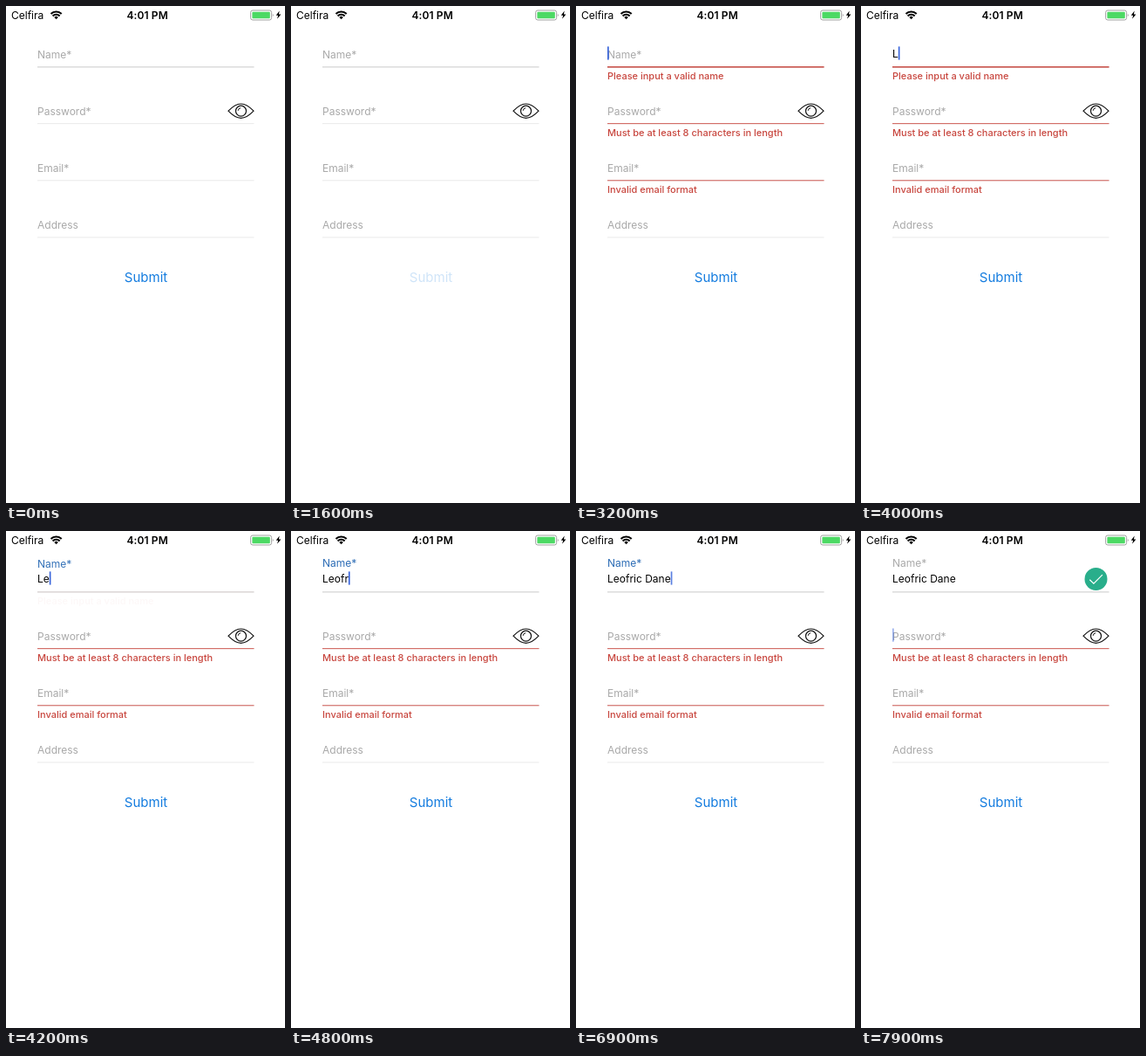
An HTML page that plays this animation: 320 by 569 pixels, repeating every 8000 ms.

```html
<!DOCTYPE html>
<html lang="en">
<head>
<meta charset="utf-8">
<title>Form validation</title>
<style>
  html, body { margin: 0; width: 100%; height: 100%; overflow: hidden; background: #fff; }
  svg { display: block; width: 320px; height: 569px; }
  text { font: 12px Inter, sans-serif; white-space: pre; }
  .label { fill: #a9a9a9; }
  .error { font-size: 11px; font-weight: 500; fill: #c8463e; }
  .time { font-weight: 600; letter-spacing: .1px; }
  #submit { font-size: 15px; fill: #147cdf; text-anchor: middle; }
</style>
</head>
<body>
<svg viewBox="0 0 320 569">
  <text x="6" y="14.5">Celfira</text>
  <g fill="none" stroke="#000" stroke-width="2.1">
    <path d="M51.5 9.1a8.6 8.6 0 0 1 12.2 0M53.6 11.5a5.5 5.5 0 0 1 8 0"/>
    <path d="M57.6 15.2l-2.2-2.3a3.1 3.1 0 0 1 4.4 0z" fill="#000" stroke="none"/>
  </g>
  <text class="time" x="162.2" y="14.5" text-anchor="middle">4:01 PM</text>
  <rect x="280.6" y="5" width="24" height="11" rx="2.4" fill="none" stroke="#8c8c8c" stroke-width=".8"/>
  <rect x="282.4" y="6.8" width="20.4" height="7.4" rx="1" fill="#4cd964"/>
  <path d="M305.9 8.7q1.5 1.8 0 3.6z" fill="#777"/>
  <path d="M313.7 5.6l-4 5.2h2.4l-1 4 4.3-5.4h-2.5z"/>

  <g id="fields"></g>

  <g fill="none" stroke="#111" stroke-width="1.2">
    <path d="M255 120.2C260 115 265 112 269.5 112S279 115 284 120.2C279 125.5 274 128.4 269.5 128.4S260 125.5 255 120.2z"/>
    <circle cx="269.5" cy="120.2" r="6"/>
    <path d="M266.2 119.8a3.4 3.4 0 0 1 3-3.1" stroke-width="1"/>
  </g>
  <text id="title" class="label" x="36">Name*</text>
  <text id="value" x="36" y="59"></text>
  <rect id="caret" width="1.7" height="15.2" fill="#3a66dc"/>
  <g id="check">
    <circle cx="269.5" cy="55" r="13" fill="#29ae8b"/>
    <path d="M262.3 55.7l4.6 4.4 10-10" fill="none" stroke="#fff" stroke-width="1.2"/>
  </g>
  <text id="submit" x="160.5" y="316.3">Submit</text>
</svg>
<script>
const LOOP = 8000, STEP = 100, LEFT = 36, ROW = 65.11;
const NAME = "Leofric Dane";
// When each character of the name has been typed; the space comes with the letter before it.
const KEYS = [4000, 4200, 4400, 4700, 4800, 5100, 5300, 5300, 5800, 5900, 6100, 6300];
const FIELDS = [
  ["Name*", "Please input a valid name", 1.3, "#d6d6d6"],
  ["Password*", "Must be at least 8 characters in length", .8, "#e4e4e4"],
  ["Email*", "Invalid email format", .8, "#e4e4e4"],
  ["Address", "", .8, "#e4e4e4"]
];
const $ = id => document.getElementById(id);

$("fields").innerHTML = FIELDS.map(([label, error, height, gray], i) => {
  const y = i * ROW;
  const line = fill =>
    `<rect x="${LEFT}" y="${y + 69.2}" width="248.5" height="${height}" fill="${fill}"/>`;
  const warning = `<g class="invalid">${line("#c8372f")}
    <text class="error" x="${LEFT}" y="${y + 83.9}">${error}</text></g>`;
  return `<text class="label" x="${LEFT}" y="${y + 59.9}">${label}</text>
    ${line(gray)}${error && warning}`;
}).join("");

const placeholder = document.querySelector(".label");
const invalid = [...document.querySelectorAll(".invalid")];
const clamp = v => Math.min(1, Math.max(0, v));
const easeOut = (t, start, duration) => 1 - (1 - clamp((t - start) / duration)) ** 3;
const show = (el, opacity) => el.setAttribute("opacity", opacity);

function caretOpacity(t) {
  const fade = start => clamp(1 - (t - start) / 300);
  if (t < 3200) return 0;
  if (t < 4000) return fade(3500);
  if (t < 7300) return fade(6850);
  return fade(7750);
}

function draw(t) {
  const alert = easeOut(t, 1600, 500);
  const float = easeOut(t, 4000, 300);
  const done = easeOut(t, 7300, 300);

  invalid.forEach((el, i) => show(el, i ? alert : alert * (1 - float)));
  show($("submit"), t < 1600 ? 1 : .2 + .8 * alert);

  show(placeholder, t < 4000 ? 1 : 0);
  const title = $("title");
  show(title, float);
  title.setAttribute("y", 59.3 - 18 * float);
  title.style.fill = `color-mix(in srgb, #a9a9a9 ${done * 100}%, #2c6cb5)`;

  const value = $("value");
  value.textContent = NAME.slice(0, KEYS.filter(k => k <= t).length);
  const onPassword = t >= 7300;
  const caret = $("caret");
  caret.setAttribute("x", LEFT + (onPassword ? 0 : value.getComputedTextLength()));
  caret.setAttribute("y", 46.4 + (onPassword ? ROW : 0));
  show(caret, caretOpacity(t));
  show($("check"), done);
}

const start = performance.now();
function tick() {
  const t = (performance.now() - start) % LOOP;
  draw(Math.floor(t / STEP) * STEP);
  requestAnimationFrame(tick);
}
tick();
</script>
</body>
</html>
```
